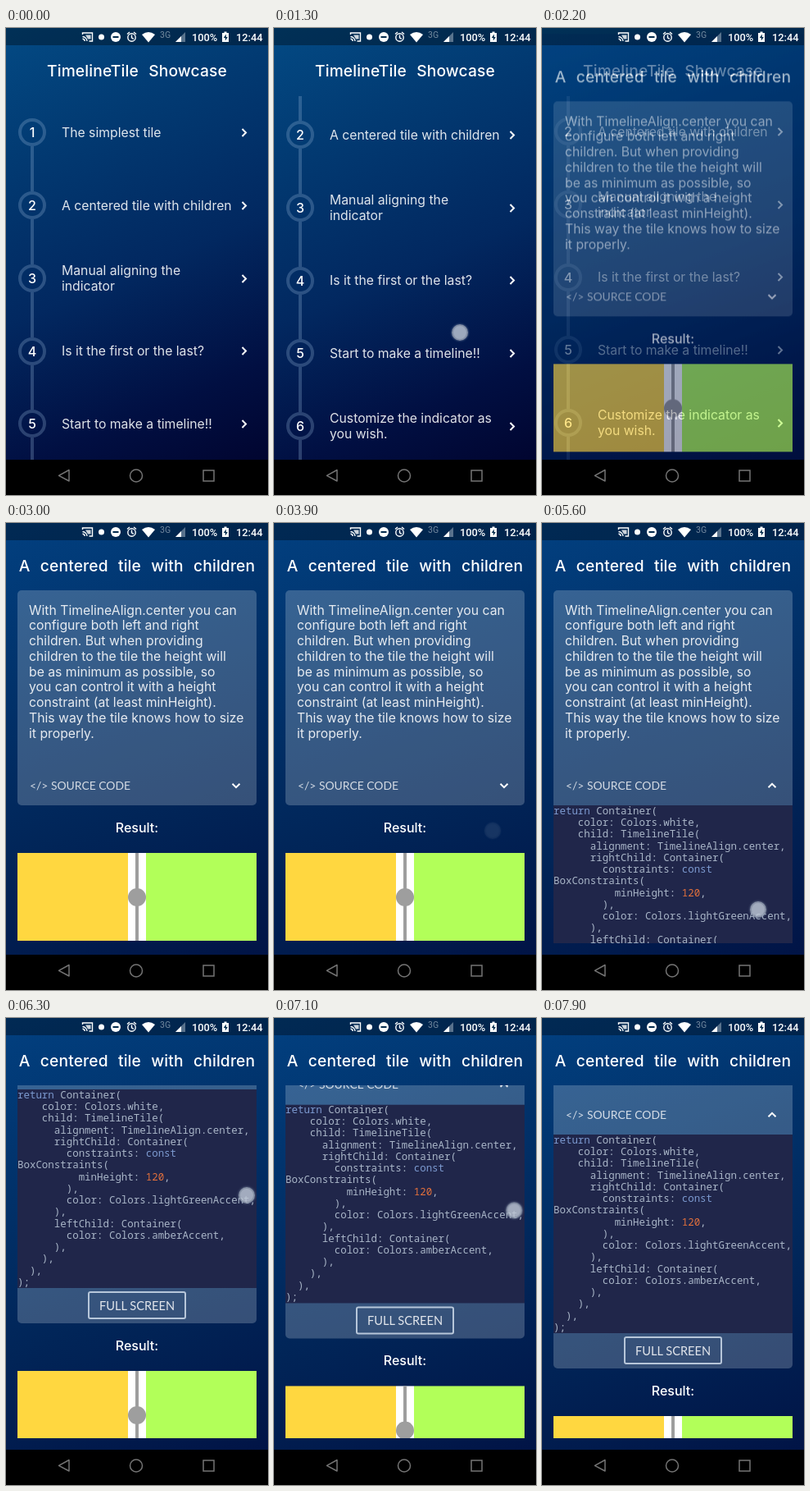
Write an HTML page that moves like this. It is 320 px wide and 569 px high and loops after 8 s.

```html
<!DOCTYPE html>
<html lang="en">
<head>
<meta charset="utf-8">
<title>Timeline showcase</title>
<style>
html, body { margin: 0; width: 100%; height: 100%; overflow: hidden; background: #000; }
* { box-sizing: border-box; }
#stage { position: absolute; left: 0; top: 0; width: 320px; height: 569px; overflow: hidden; background: #000;
  color: rgba(255,255,255,.88); font: 400 15.75px/18.75px Inter, sans-serif; --loop: 8s linear infinite; }
#screen { position: absolute; width: 320px; height: 526px; overflow: hidden; }
.page { position: absolute; inset: 0;
  background: linear-gradient(157deg, #034a84 0%, #023a72 25%, #022860 55%, #010f42 82%, #010530 100%); }
.title { position: absolute; left: 0; top: 38.5px; width: 320px; line-height: 26px; text-align: center;
  white-space: nowrap; color: #fff; font-size: 19.2px; font-weight: 500; word-spacing: 7px; letter-spacing: .15px; }
svg { display: block; }
.bars { position: absolute; left: 0; top: 0; }

/* list page */
.list { position: absolute; top: 83px; left: 0; width: 320px; height: 443px; overflow: hidden; }
.rows { animation: listScroll var(--loop); }
.row { position: relative; height: 88.75px; display: flex; align-items: center; padding: 2px 0 0 68px; white-space: pre; }
.row::before, .row::after { content: ""; position: absolute; left: 30px; width: 4px; background: rgba(150,180,215,.29); }
.row::before { top: 0; height: 27.4px; }
.row::after { bottom: 0; height: 27.4px; }
.row:first-child::before { display: none; }
.num { position: absolute; left: 15px; top: 27.4px; width: 34px; height: 34px; border-radius: 50%;
  border: 4px solid rgba(150,180,215,.29); text-align: center; font-size: 16px; line-height: 26px; font-weight: 500; color: #fff; }
.row svg { position: absolute; left: 286px; top: 38px; }
.chev { fill: none; stroke: #fff; stroke-width: 2; }

/* detail page */
.detail { background: linear-gradient(162deg, #024080 0%, #01336c 30%, #012558 65%, #011446 100%);
  animation: pageFade var(--loop), pageRise var(--loop); }
.view { position: absolute; left: 14px; top: 82px; width: 292px; height: 430px; overflow: hidden; }
.inner { animation: detailScroll var(--loop); }
.card { border-radius: 5px; overflow: hidden; background: rgba(255,255,255,.21); }
.desc { height: 213px; padding: 15.5px 0 0 14px; white-space: pre; }
.head { position: relative; height: 49px; padding-left: 15px; font: 400 13.9px/49px Lato, sans-serif; color: rgba(255,255,255,.78); }
.head svg { position: absolute; left: 261px; top: 19px; animation: flip var(--loop); }
.fold { display: flex; flex-direction: column; justify-content: center; overflow: hidden; animation: expand var(--loop); }
pre { flex: none; margin: 0; height: 242px; background: #20264a; color: #a9b6c8; overflow: hidden;
  font: 400 12.45px/14.24px "Noto Sans Mono", monospace; }
pre b { font-weight: 400; color: #7c9ad0; }
pre i { font-style: normal; color: #e2703c; }
.foot { flex: none; height: 43px; padding-top: 4px; }
.btn { width: 120px; height: 34px; margin: 0 auto; border: 2px solid rgba(215,228,242,.8); border-radius: 3px;
  text-align: center; font: 400 14.6px/31px Lato, sans-serif; color: rgba(255,255,255,.85); }
.label { height: 58px; line-height: 54px; text-align: center; font-size: 16px; font-weight: 500; color: #fff; }
.result { position: relative; height: 107px;
  background: linear-gradient(90deg, #ffd740 135px, #fff 135px 157px, #b2ff59 157px); }
.result::before { content: ""; position: absolute; left: 144px; width: 4px; height: 107px; background: #9e9e9e; }
.result::after { content: ""; position: absolute; left: 135px; top: 42.5px; width: 22px; height: 22px; border-radius: 50%; background: #9e9e9e; }

/* finger */
#touch { position: absolute; left: -10px; top: -10px; width: 20px; height: 20px; border-radius: 50%;
  background: rgba(190,200,214,.92); border: 2px solid rgba(140,152,172,.8); box-shadow: 0 0 3px rgba(140,155,180,.8);
  animation: finger var(--loop); }

@keyframes listScroll {
  0%, 8.75% { transform: none; animation-timing-function: ease-in-out; }
  16.25% { transform: translateY(-86px); animation-timing-function: ease-out; }
  20%, 100% { transform: translateY(-90px); }
}
@keyframes pageFade {
  0%, 24.6875% { opacity: 0; animation-timing-function: ease-in; }
  28.4375%, 100% { opacity: 1; }
}
@keyframes pageRise {
  0%, 24.6875% { transform: translateY(142px); animation-timing-function: cubic-bezier(.4,0,.2,1); }
  28.6%, 100% { transform: none; }
}
@keyframes expand {
  0%, 55.625% { height: 0; animation-timing-function: ease-in; }
  58.125%, 100% { height: 285px; }
}
@keyframes flip {
  0%, 55.625% { transform: none; animation-timing-function: ease-in; }
  58.125%, 100% { transform: rotate(180deg); }
}
@keyframes detailScroll {
  0%, 70% { transform: none; animation-timing-function: ease-in-out; }
  78.75%, 86.25% { transform: translateY(-257px); animation-timing-function: ease-in-out; }
  92.5%, 100% { transform: translateY(-202px); }
}
@keyframes finger {
  0%, 7.5% { transform: translate(222px,470px); opacity: 0; }
  8.75% { transform: translate(222px,470px); opacity: .9; animation-timing-function: ease-in-out; }
  16.25% { transform: translate(227px,371px); opacity: .9; }
  18.125% { transform: translate(228px,367px); opacity: .9; }
  19.375% { transform: translate(228px,367px); opacity: 0; }
  21.875% { transform: translate(200px,126px); opacity: 0; }
  23.125%, 24.375% { transform: translate(200px,126px); opacity: .9; }
  25.625% { transform: translate(200px,126px); opacity: 0; }
  47.5% { transform: translate(267px,375px); opacity: 0; }
  48.75% { transform: translate(267px,375px); opacity: .13; }
  53.75%, 55.25% { transform: translate(280px,322px); opacity: .9; }
  56.25% { transform: translate(280px,322px); opacity: 0; }
  66.25% { transform: translate(264px,473px); opacity: 0; }
  67.5% { transform: translate(264px,473px); opacity: .9; }
  70% { transform: translate(264px,471px); opacity: .9; animation-timing-function: ease-in-out; }
  78.75%, 86.25% { transform: translate(294px,216px); opacity: .9; animation-timing-function: ease-in-out; }
  92.5% { transform: translate(292px,271px); opacity: .9; }
  95%, 100% { transform: translate(292px,271px); opacity: 0; }
}
</style>
</head>
<body>
<div id="stage">
  <div id="screen">
    <div class="page">
      <div class="title">TimelineTile Showcase</div>
      <div class="list"><div class="rows" id="rows"></div></div>
    </div>
    <div class="page detail">
      <div class="title">A centered tile with children</div>
      <div class="view"><div class="inner">
        <div class="card">
          <div class="desc">With TimelineAlign.center you can
configure both left and right
children. But when providing
children to the tile the height will
be as minimum as possible, so
you can control it with a height
constraint (at least minHeight).
This way the tile knows how to size
it properly.</div>
          <div class="head">&lt;/&gt; SOURCE CODE<svg width="12" height="12"><path class="chev" d="M1.5 3.8 6 8.2l4.5-4.4"/></svg></div>
          <div class="fold">
<pre><b>return</b> Container(
    color: Colors.white,
    child: TimelineTile(
      alignment: TimelineAlign.center,
      rightChild: Container(
        constraints: <b>const</b>
BoxConstraints(
          minHeight: <i>120</i>,
        ),
        color: Colors.lightGreenAccent,
      ),
      leftChild: Container(
        color: Colors.amberAccent,
      ),
    ),
  ),
);</pre>
            <div class="foot"><div class="btn">FULL SCREEN</div></div>
          </div>
        </div>
        <div class="label">Result:</div>
        <div class="result"></div>
      </div></div>
    </div>
  </div>

  <svg class="bars" width="320" height="569" fill="#fff" font-family="Roboto, sans-serif" font-weight="500">
    <rect width="320" height="21" fill="#000" opacity=".34"/>
    <!-- cast -->
    <g fill="none" stroke="#fff" stroke-width="1.4">
      <path d="M93.5 8V6h12v10h-4M93.5 10.5a6 6 0 0 1 5.5 5.5M93.5 13.3a3 3 0 0 1 2.7 2.7"/>
      <circle cx="153.5" cy="11.5" r="4.7"/>
      <path d="M153.5 8.5v3.3l2.3 1.5M148 7.5l3-2.5M159 7.5l-3-2.5"/>
    </g>
    <path d="M97 8.5h6.5v5H100z" opacity=".8"/>
    <circle cx="116.5" cy="11" r="3.5"/>
    <circle cx="134" cy="11" r="6"/>
    <path d="M130.5 10h7v2h-7z" fill="#012a4c"/>
    <path d="M166 8q8-6 16 0l-8 9.5z"/>
    <text x="188" y="11.5" font-size="10.5" font-weight="400" opacity=".45">3G</text>
    <path d="M207 17h12V5z" opacity=".35"/>
    <path d="M207 17h7v-7z"/>
    <text x="227" y="15.5" font-size="12.8">100%</text>
    <path d="M264 6h2.5V4.5h3V6h2.5v11h-8z"/>
    <path d="M268.8 7.5l-3 4.5h2v3.5l3-4.5h-2z" fill="#012a4c"/>
    <text x="281" y="15.5" font-size="12.8">12:44</text>
    <!-- navigation -->
    <rect y="526" width="320" height="43" fill="#000"/>
    <g fill="none" stroke="#747474" stroke-width="1.5">
      <path d="M77 538.5v13.5l-12.5-6.7z" stroke-linejoin="round"/>
      <circle cx="159" cy="545.5" r="7.5"/>
      <rect x="241" y="539" width="13" height="13"/>
    </g>
  </svg>
  <div id="touch"></div>
</div>
<script>
const tiles = [
  "The simplest tile",
  "A centered tile with children",
  "Manual aligning the\nindicator",
  "Is it the first or the last?",
  "Start to make a timeline!!",
  "Customize the indicator as\nyou wish."
];
document.getElementById("rows").innerHTML = tiles.map((text, i) =>
  `<div class="row"><span class="num">${i + 1}</span>${text}<svg width="10" height="13"><path class="chev" d="M2.5 2 7 6.5 2.5 11"/></svg></div>`
).join("");
</script>
</body>
</html>
```
